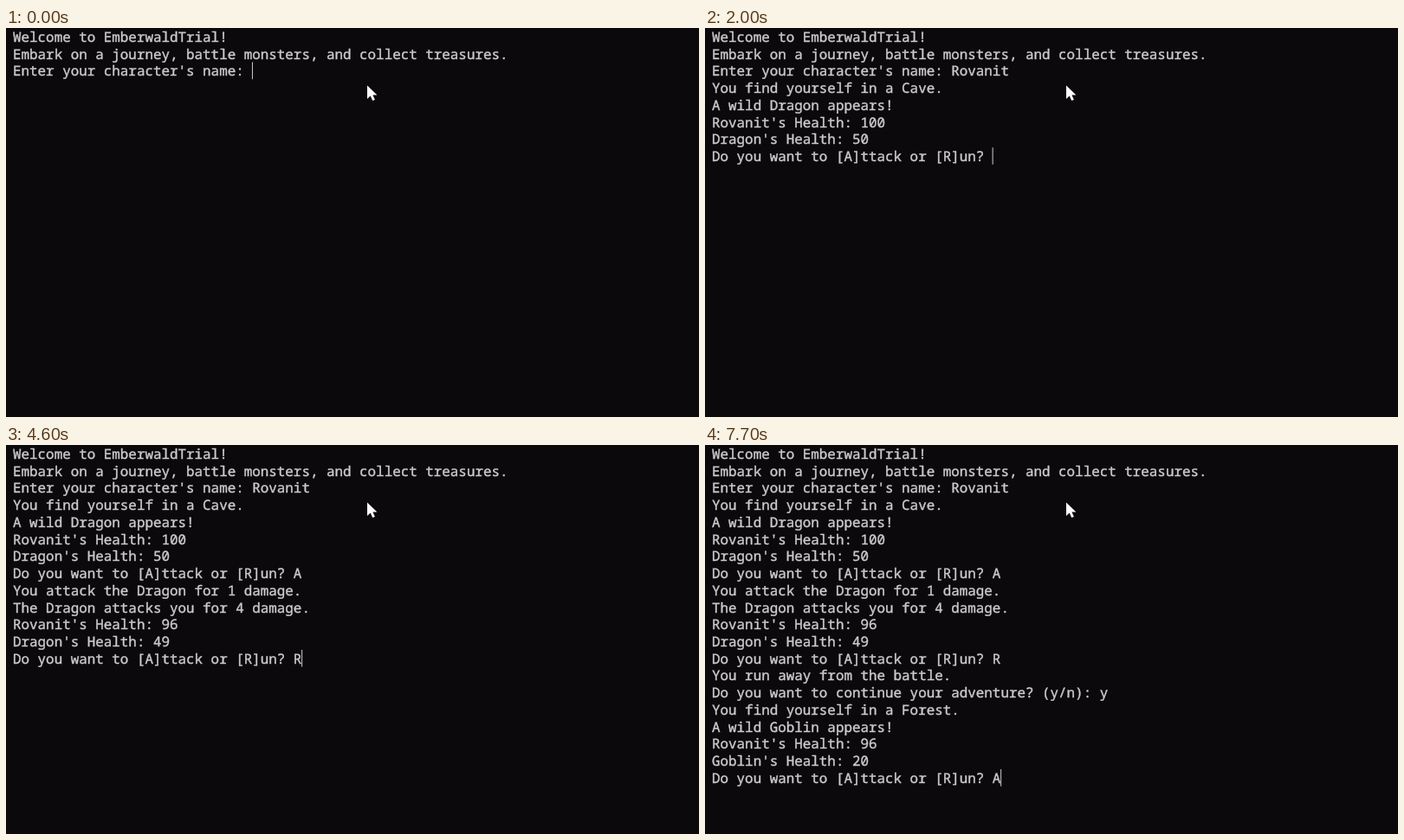
An HTML page for the animation above (8 s loop, 800x450 px).

```html
<!DOCTYPE html>
<html lang="en">
<head>
<meta charset="utf-8">
<title>Text adventure</title>
<style>
html, body { margin: 0; width: 100%; height: 100%; overflow: hidden; background: #0b090c; }
pre {
  position: absolute; left: 8px; top: 0.9px; margin: 0; color: #ccc;
  font: 500 15.88px/19.74px "Noto Sans Mono", "DejaVu Sans Mono", monospace;
  -webkit-text-stroke: 0.4px #ccc;
  font-variant-ligatures: none; text-rendering: geometricPrecision;
}
svg { position: absolute; left: 0; top: 0; }
</style>
</head>
<body>
<pre id="screen"></pre>
<svg width="800" height="450">
  <rect id="caret" width="1" height="19.74" fill="#ccc"/>
  <path d="M417 66.5V82l3.7-3.4 2.5 5.4 2.7-1.1-2.5-5.3h5z" fill="#fff"/>
</svg>
<script>
const LOOP = 8000, COL = 9.53, ROW = 19.74;
const HERO = "Rovanit";
const ASK = "Do you want to [A]ttack or [R]un? ";
const INTRO = `Welcome to EmberwaldTrial!
Embark on a journey, battle monsters, and collect treasures.
Enter your character's name: `;

const status = (hp, foe, foeHp) => `${HERO}'s Health: ${hp}\n${foe}'s Health: ${foeHp}\n${ASK}`;
const meet = (place, foe, hp, foeHp) =>
  `\nYou find yourself in a ${place}.\nA wild ${foe} appears!\n` + status(hp, foe, foeHp);

// [time, printed text]; without text the caret toggles
const events = [
  [500],
  ...[600, 700, 800, 900, 1000, 1200, 1300].map((t, i) => [t, HERO[i]]),
  [1400, meet("Cave", "Dragon", 100, 50)],
  [1700], [2000], [2400], [2700],
  [3200, "A"],
  [3400, "\nYou attack the Dragon for 1 damage.\nThe Dragon attacks you for 4 damage.\n" + status(96, "Dragon", 49)],
  [3900], [4100], [4500],
  [4600, "R"],
  [5000, "\nYou run away from the battle.\nDo you want to continue your adventure? (y/n): "],
  [5300], [5600], [6100], [6500],
  [6600, "y"],
  [6800, meet("Forest", "Goblin", 96, 20)],
  [7600],
  [7700, "A"]
];

const screenEl = document.getElementById("screen");
const caret = document.getElementById("caret");
const start = performance.now();

function draw() {
  const t = (performance.now() - start) % LOOP;
  let text = INTRO, on = true;
  for (const [time, added] of events) {
    if (time > t) break;
    text += added || "";
    on = added ? true : !on;
  }
  if (screenEl.textContent !== text) screenEl.textContent = text;
  const lines = text.split("\n"), row = lines.length - 1;
  caret.setAttribute("x", 7.6 + lines[row].length * COL);
  caret.setAttribute("y", row * ROW);
  caret.style.visibility = on ? "visible" : "hidden";
  requestAnimationFrame(draw);
}
draw();
</script>
</body>
</html>
```
